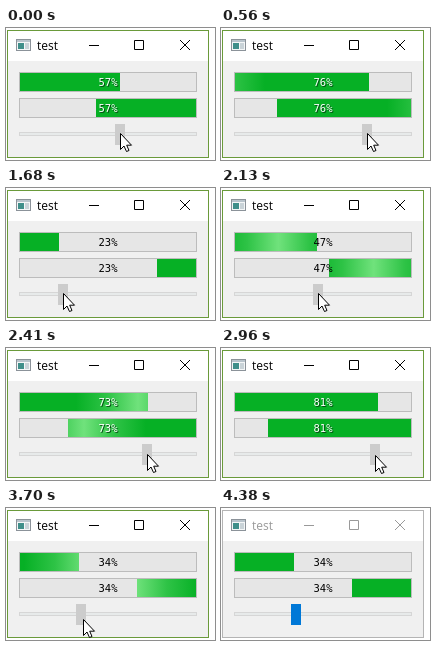
An HTML page for the animation above (4.48 s loop, 209x132 px).

```html
<!DOCTYPE html>
<html lang="en">
<head>
<meta charset="utf-8">
<title>test</title>
<style>
html, body { margin: 0; width: 100%; height: 100%; overflow: hidden; background: #fff; }
svg { display: block; }
.title { font: 12px "Open Sans", sans-serif; }
.label { font: 10.5px "DejaVu Sans Mono", monospace; text-anchor: middle; }
.line { fill: none; stroke-width: 1; }
#win { --ink: #000; --edge: #6a9a3a; }
#win.inactive { --ink: #999; --edge: #b4b4b4; }
#win .ink { stroke: var(--ink); }
#win .title { fill: var(--ink); }
#win .edge { stroke: var(--edge); }
</style>
</head>
<body>
<svg width="209" height="132" viewBox="0 0 209 132">
  <defs>
    <linearGradient id="glow1" gradientUnits="userSpaceOnUse" x1="-62" x2="62" y1="0" y2="0">
      <stop offset="0" stop-color="#70e27c" stop-opacity="0"/>
      <stop offset=".25" stop-color="#70e27c" stop-opacity=".38"/>
      <stop offset=".5" stop-color="#70e27c"/>
      <stop offset=".75" stop-color="#70e27c" stop-opacity=".38"/>
      <stop offset="1" stop-color="#70e27c" stop-opacity="0"/>
    </linearGradient>
    <linearGradient id="glow2" href="#glow1"/>
  </defs>
  <g id="win">
    <rect x="1" y="2" width="202" height="128" fill="#f0f0f0"/>
    <rect x="2" y="3" width="200" height="30" fill="#fff"/>
    <rect class="line edge" x="1.5" y="2.5" width="201" height="127"/>
    <g shape-rendering="crispEdges">
      <rect x="10" y="11" width="15" height="12" fill="#8b9299"/>
      <rect x="11" y="12" width="13" height="10" fill="#f4f6f7"/>
      <rect x="11" y="12" width="13" height="2" fill="#b9c4cc"/>
      <rect x="12" y="15" width="6" height="6" fill="#3f8f8a"/>
      <rect x="19" y="15" width="4" height="6" fill="#c9d3d8"/>
    </g>
    <text class="title" x="31" y="22">test</text>
    <path class="line ink" d="M83 17.5h10M128.5 12.5h9v9h-9z"/>
    <path class="line ink" d="M174 12l10 10M184 12l-10 10"/>
    <g id="bars"></g>
    <rect x="13.5" y="104.5" width="177" height="3" fill="#e7eaea" stroke="#d6d6d6"/>
    <rect id="handle" y="96" width="10" height="21"/>
  </g>
  <path id="cursor" d="M.5 .5V16.5L4 13L6.5 18.5L9 17.5L6.7 12.2H11.5Z" fill="#fff" stroke="#000"/>
</svg>
<script>
const LOOP = 4480;
// [start ms, percent]; the screen refreshes only at these moments
const STEPS = [
  [0, 57], [140, 64], [260, 71], [410, 75], [560, 76], [680, 75], [820, 72], [950, 69],
  [1100, 57], [1250, 42], [1400, 32], [1530, 27], [1680, 23], [1830, 24], [1980, 34],
  [2130, 47], [2260, 62], [2410, 73], [2530, 80], [2680, 83], [2830, 82], [2960, 81],
  [3100, 72], [3260, 55], [3410, 41], [3550, 34], [3700, 34], [3850, 34], [4000, 34], [4380, 34]
];
// [ms, cursor tip y]
const TIPS = [[0, 105], [2410, 106], [2530, 107], [3100, 109], [3260, 110], [3410, 111], [3850, 119]];
// [ms, glow centre] for each sweep of light
const SWEEPS = [[950, 86], [2260, 92], [3700, 80]];
const SPEED = 0.267;

const $ = id => document.getElementById(id);
const at = (list, t) => list.findLast(item => item[0] <= t);
const set = (el, attrs) => {
  for (const key in attrs) el.setAttribute(key, attrs[key]);
};

const bar = (n, y) => `
  <rect x="13.5" y="${y + .5}" width="177" height="19" fill="#e6e6e6" stroke="#bcbcbc"/>
  <rect class="fill" y="${y + 1}" height="18" fill="#06b025"/>
  <rect class="fill" y="${y + 1}" height="18" fill="url(#glow${n})"/>
  <text class="label shade" x="103" y="${y + 15}" fill="#064d14">0%</text>
  <text class="label" x="102" y="${y + 14}">0%</text>`;
$('bars').innerHTML = `<g>${bar(1, 44)}</g><g>${bar(2, 70)}</g>`;

function glowCentre(t) {
  const [time, x] = SWEEPS.find(s => t < s[0] + 600) || SWEEPS[2];
  return x + (t - time) * SPEED;
}

function draw(now) {
  const [t, value] = at(STEPS, now % LOOP);
  const width = Math.round(1.78 * value - 1.5);
  const light = value >= 50;
  const centre = glowCentre(t);

  [...$('bars').children].forEach((group, i) => {
    group.querySelectorAll('.fill').forEach(r => set(r, { x: i ? 190 - width : 14, width }));
    group.querySelectorAll('.label').forEach(label => {
      const shade = label.classList.contains('shade');
      label.textContent = value + '%';
      if (shade) set(label, { visibility: light ? 'visible' : 'hidden' });
      else set(label, { fill: light ? '#fff' : '#000' });
    });
    set($('glow' + (i + 1)), { gradientTransform: `translate(${i ? 210 - centre : centre})` });
  });

  const x = Math.round(13 + 1.68 * value);
  set($('handle'), { x, fill: t < 3850 ? '#ccc' : '#0078d7' });
  set($('cursor'), {
    transform: `translate(${x + (t < 3410 ? 5 : 7)} ${at(TIPS, t)[1]})`,
    visibility: t < 4000 ? 'visible' : 'hidden'
  });
  $('win').classList.toggle('inactive', t >= 4380);
}

const start = performance.now();
function tick() {
  draw(performance.now() - start);
  requestAnimationFrame(tick);
}
tick();
</script>
</body>
</html>
```
